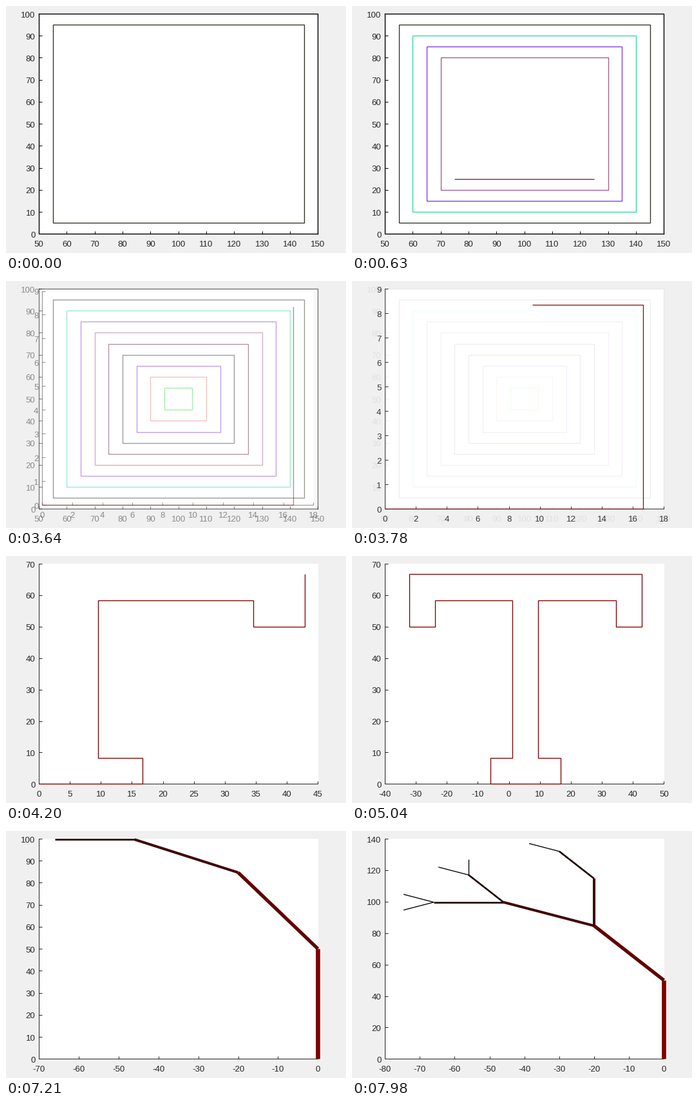
Recreate the animation shown at these times as a matplotlib script. Size 528 px wide and 384 px high, loop 8000 ms.

```python
import math
from itertools import accumulate

import matplotlib.pyplot as plt
import numpy as np
from matplotlib.animation import FuncAnimation

WIDTH, HEIGHT, DPI = 528, 384, 96
LOOP_MS, INTERVAL, STEP_MS = 8000, 20, 70
PX = 72 / DPI

# Steps at which the letter and the tree take over
LETTER_START, TREE_START = 52, 100
FULL_BOX = np.array([51.0, 12.0, 484.4, 354.4])  # left, top, right, bottom
INSET = np.array([5.0, 3.5, -7.0, -6.0])

GRAY, INK, RED = "#f0f0f0", "#262626", "#7f0000"
RECT_COLORS = ["#2e3020", "#2fd99a", "#8038dc", "#a65a8c", "#6a2048",
               "#2c3a48", "#7a38e0", "#f08080", "#40dc50"]


def rectangles(sides):
    """Nested rectangles, drawn one side after another."""
    strokes = []
    for i, color in enumerate(RECT_COLORS):
        count = min(4, sides - 4 * i)
        if count <= 0:
            break
        x0, x1, y0, y1 = 55 + 5 * i, 145 - 5 * i, 5 + 5 * i, 95 - 5 * i
        xs, ys = [x0, x1, x1, x0, x0], [y0, y0, y1, y1, y0]
        strokes.append((xs[:count + 1], ys[:count + 1], color, 1.33))
    return strokes


def letter(count):
    """Outline of a T, alternating horizontal and vertical moves."""
    u, v = 25 / 3, 50 / 7
    across = [2 * u, -v, 25, u, -75, u, 25, -v, u * 5 / 7]
    upward = [u, 50, -u, 2 * u, -2 * u, u, -50, -u]
    corners_x = np.round(list(accumulate(across, initial=0)), 6)
    corners_y = np.round(list(accumulate(upward, initial=0)), 6)
    xs = np.repeat(corners_x, 2)[1:count + 2]
    ys = np.repeat(corners_y, 2)[:count + 1]
    xs = np.concatenate([[0], xs])[:count + 1] if xs[0] else xs
    return [(xs, ys, RED, 1.33)]


def branches(x, y, angle, length):
    """Depth-first list of strokes; thinner and darker towards the tips."""
    end_x = round(x + length * math.cos(math.radians(angle)), 6)
    end_y = round(y + length * math.sin(math.radians(angle)), 6)
    color = (0.5 * (length - 10) / 40, 0, 0)
    strokes = [([x, end_x], [y, end_y], color, length / 10 / PX)]
    if length > 10:
        strokes += branches(end_x, end_y, angle + 30, length - 10)
        strokes += branches(end_x, end_y, angle - 30, length - 10)
    return strokes


TREE = branches(0, 0, 90, 50)


def nice_ticks(values):
    """Round limits outwards with at most ten intervals."""
    lo, hi = min(values), max(values)
    if lo == hi:
        lo, hi = lo - 1, hi + 1
    for exponent in range(-1, 4):
        for mantissa in (1, 2, 5):
            step = mantissa * 10.0 ** exponent
            first = math.floor(round(lo / step, 6))
            last = math.ceil(round(hi / step, 6))
            if last - first <= 10:
                return np.round(np.arange(first, last + 1) * step, 6) + 0.0


fig = plt.figure(figsize=(WIDTH / DPI, HEIGHT / DPI), dpi=DPI, facecolor=GRAY)
ax = fig.add_axes([0, 0, 1, 1])
ax.set_xlim(0, WIDTH)
ax.set_ylim(HEIGHT, 0)
ax.autoscale(False)
ax.axis("off")


def draw_background(box, alpha=1):
    left, top, right, bottom = box
    ax.add_patch(plt.Rectangle((left, top), math.ceil(right) - left,
                               math.ceil(bottom) - top,
                               fc="white", ec="none", alpha=alpha))


def draw_plot(strokes, box, alpha=1, boxed=False):
    left, top, right, bottom = box
    xticks = nice_ticks(np.concatenate([s[0] for s in strokes]))
    yticks = nice_ticks(np.concatenate([s[1] for s in strokes]))

    def to_x(v):
        return left + (np.asarray(v) - xticks[0]) / (xticks[-1] - xticks[0]) * (right - left)

    def to_y(v):
        return bottom - (np.asarray(v) - yticks[0]) / (yticks[-1] - yticks[0]) * (bottom - top)

    color = "black" if boxed else INK
    style = dict(color=color, lw=(1.4 if boxed else 1) * PX, alpha=alpha)
    ax.plot([left, left, right], [top, bottom, bottom], **style)
    if boxed:
        ax.plot([left, right, right], [top, top, bottom], **style)
    style["lw"] = PX
    ax.vlines(to_x(xticks), bottom - 4.5, bottom, **style)
    ax.hlines(to_y(yticks), left, left + 4.5, **style)

    font = dict(family="Liberation Sans", size=13.3 * PX, color=INK,
                alpha=alpha, va="baseline")
    for v in xticks:
        ax.text(to_x(v), bottom + 19.6, f"{v:g}", ha="center", **font)
    for v in yticks:
        ax.text(left - 5.5, to_y(v) + 5.5, f"{v:g}", ha="right", **font)

    for xs, ys, stroke_color, width in strokes:
        ax.plot(to_x(xs), to_y(ys), color=stroke_color, lw=width * PX, alpha=alpha,
                solid_capstyle="butt", solid_joinstyle="miter")


def draw_fading(old, new, age, first_remain, old_boxed=False):
    """Dissolve from the old plot while the new one settles into place."""
    remain = first_remain * 0.4 ** age if age < 3 else 0
    box = FULL_BOX + INSET * (1, 0.3, 0)[min(age, 2)]
    if remain:
        draw_background(FULL_BOX, remain)
    draw_background(box)
    if remain:
        draw_plot(old, FULL_BOX, remain, old_boxed)
    draw_plot(new, box, 1 - remain)


def draw_step(step):
    if step < LETTER_START:
        draw_background(FULL_BOX)
        draw_plot(rectangles(4 + min(32, 32 * step // 21)), FULL_BOX, boxed=True)
    elif step < TREE_START:
        age = step - LETTER_START
        count = min(17, 3 + (7 * (age - 2) + 6) // 9)
        draw_fading(rectangles(36), letter(count), age, 0.5, old_boxed=True)
    else:
        age = step - TREE_START
        count = age + 1 - max(0, (age - 1) // 4)
        draw_fading(letter(17), TREE[:count], age, 0.6)


shown = {"step": None}


def update(i):
    step = (i * INTERVAL + INTERVAL // 2) // STEP_MS
    if step != shown["step"]:
        for artist in [*ax.lines, *ax.texts, *ax.patches, *ax.collections]:
            artist.remove()
        draw_step(step)
        shown["step"] = step
    return []


anim = FuncAnimation(fig, update, frames=LOOP_MS // INTERVAL, interval=INTERVAL,
                     repeat=True, repeat_delay=0, blit=False)
plt.show()
```
